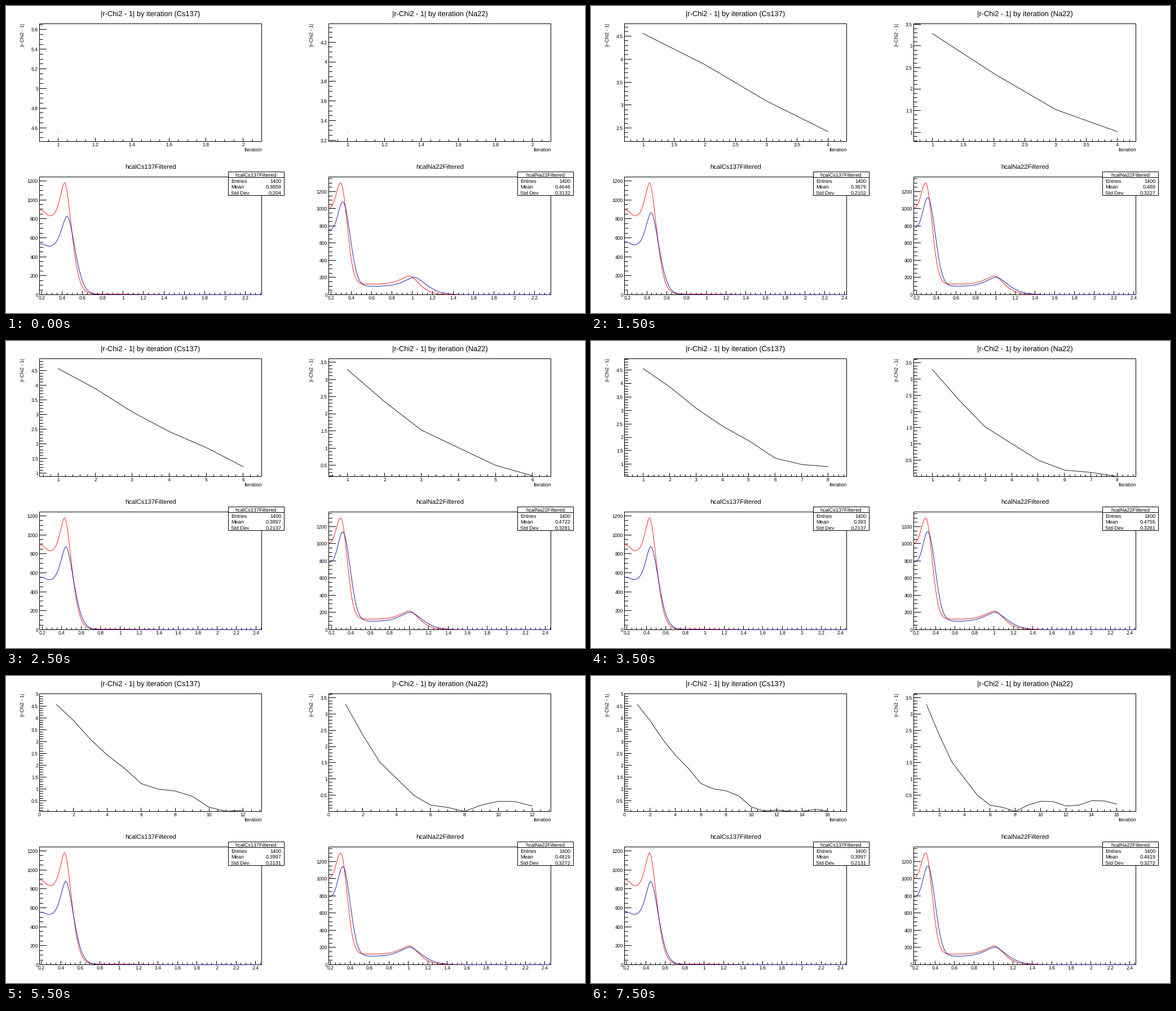
A matplotlib script that plays this animation: 1027 px wide and 545 px high, repeating every 8 s.

```python
import numpy as np
import matplotlib.pyplot as plt
from matplotlib.animation import FuncAnimation
from matplotlib.patches import Rectangle

W, H, DPI = 1027, 545, 100
STEPS, INTERVAL = 16, 500
PX = 72 / DPI
LEFT, WIDTH, SHIFT = 59.5, 394, 513
TOP, BASE, HEIGHT = 240.5, 512.5, 209
RED, BLUE = (1, 0, 0), (0, 0, 0.6)

plt.rcParams["font.family"] = "Liberation Sans"
plt.rcParams["text.hinting"] = "none"

# |r-Chi2 - 1| after each iteration
CHI = {
    "Cs137": [4.56, 3.885, 3.089, 2.42, 1.875, 1.225, 0.99, 0.91,
              0.694, 0.228, 0.055, 0.1, 0.05, 0.042, 0.13, 0.06],
    "Na22": [3.288, 2.36, 1.527, 1.015, 0.508, 0.2, 0.13, 0.005,
             0.2, 0.315, 0.307, 0.172, 0.2, 0.335, 0.327, 0.232],
}
Y_MAX = {"Cs137": 1241, "Na22": 1370}

# Calibration: statistics of the Cs137 spectrum at a few iterations
KEYS = [1, 4, 6, 8, 10, 12]
MEAN = [0.3859, 0.3879, 0.3897, 0.393, 0.396, 0.3997]
STD = [0.204, 0.2102, 0.2137, 0.2137, 0.2143, 0.2131]

fig = plt.figure(figsize=(W / DPI, H / DPI), dpi=DPI, facecolor="white")
ax = fig.add_axes([0, 0, 1, 1])
u = np.arange(0, WIDTH + 0.5, 0.5)


def peak(centre, height, floor, left, right, power):
    """Peak on a plateau that ends at the peak; widths differ per side."""
    d = u - centre
    core = np.exp(-(abs(d) / np.where(d < 0, left, right)) ** power)
    floor = np.where(d < 0, floor, 0)
    return floor + (height - floor) * core


def tail(height):
    return height * np.clip(1 - u / 240, 0, 1)


def cesium(centre, height, floor, left, right, bump, rest):
    shoulder = bump * np.exp(-(u / 12.5) ** 2.5)
    return peak(centre, height, floor, left, right, 1.75) + shoulder + tail(rest)


def sodium(first, second):
    return peak(*first, 2) + peak(*second, 1.6) + tail(9)


def measured(source):
    if source == "Cs137":
        return cesium(44.5, 1170, 812, 11.2, 17.6, 70, 12)
    return sodium((21, 1175, 875, 10.5, 16), (143.5, 215, 117, 24, 24.5))


def simulated(source, n):
    """Simulation settling towards the measurement, with a little noise."""
    s = np.exp(-(n - 1) / 2.5)
    noise = np.random.default_rng(n).uniform(-1, 1)
    if source == "Cs137":
        return cesium(46.5 + 2.5 * s, 878 - 52 * s, 520 - 20 * s,
                      12.5 + 1.5 * s, 19.7, 34 + 6 * noise, 3)
    return sodium((24.8, 1046 - 67 * s + 6 * noise, 683 - 35 * s, 11.3, 18.2),
                  (144 + 8 * s, 200, 92, 26, 30))


def text(x, y, s, size, ha="center", **kw):
    ax.text(x, y, s, fontsize=size * PX, ha=ha, va="baseline", **kw)


def line(x, y, color="black", width=1):
    ax.plot(x, y, color=color, lw=width * PX, snap=False)


def box(x, y, w, h, fill="none"):
    ax.add_patch(Rectangle((x, y), w, h, fc=fill, ec="black", lw=PX,
                           snap=False, zorder=2))


def nice_step(span, parts):
    raw = span / parts
    power = 10 ** np.floor(np.log10(raw) + 1e-9)
    return power * next(k for k in (1, 2, 5, 10) if raw / power <= k + 1e-6)


def multiples(step, lo, hi):
    eps = step * 1e-6
    first, last = np.ceil((lo - eps) / step), np.floor((hi + eps) / step)
    return np.arange(first, last + 1) * step


def axis(x0, base, lo, hi, parts, vertical):
    """Ticks and labels along one edge of a pad."""
    major = nice_step(hi - lo, parts)
    minor = nice_step(major, 5)
    length = 12 if vertical else 6
    size = HEIGHT if vertical else WIDTH
    for step, tick in ((minor, length / 2), (major, length)):
        for v in multiples(step, lo, hi):
            p = (v - lo) / (hi - lo) * size
            label = f"{round(v, 6) + 0.0:g}" if step == major else ""
            if vertical:
                p = np.floor(base - p) + 0.5
                line([x0, x0 + tick], [p, p])
                text(x0 - 2.5, p + 3, label, 8.7, "right")
            else:
                p = np.floor(x0 + p) + 0.5
                line([p, p], [base, base - tick])
                text(p, base + 8.5, label, 8.7)


def pad(x0, base, xr, yr, parts):
    box(x0, base - HEIGHT, WIDTH, HEIGHT)
    axis(x0, base, *xr, parts, vertical=False)
    axis(x0, base, *yr, parts, vertical=True)


def margins(values, floor):
    lo, hi = min(values), max(values)
    if lo == hi:
        hi += 1
    d = 0.1 * (hi - lo)
    return (floor if lo - d < 0 else lo - d), hi + d


def draw_graph(source, x0, n):
    ys = np.array(CHI[source][:n])
    xs = np.arange(1, n + 1)
    xr, yr = margins(xs, 0), margins(ys, 0.9 * ys.min())
    pad(x0, TOP, xr, yr, 10)
    px = x0 + (xs - xr[0]) / (xr[1] - xr[0]) * WIDTH
    py = TOP - (ys - yr[0]) / (yr[1] - yr[0]) * HEIGHT
    if n == 1:
        ax.plot(px, py, ",", color="0.5")
    else:
        line(px, py, width=0.85)
    text(x0 + WIDTH / 2, 18, f"|r-Chi2 - 1| by iteration ({source})", 12.9)
    text(x0 + WIDTH + 0.5, 258, "Iteration", 8.8, "right")
    text(x0 - 27, 30.5, "|r-Chi2 - 1|", 8.8, "right",
         rotation=90, rotation_mode="anchor")


def draw_stats(x, name, mean, std):
    box(x, 294.5, 99, 42, "white")
    line([x, x + 99], [304.5, 304.5])
    text(x + 49, 303, name, 9.1)
    rows = ("Entries", "1400"), ("Mean", f"{mean:.4g}"), ("Std Dev", f"{std:.4g}")
    for i, (key, value) in enumerate(rows):
        y = 314 + 10.4 * i
        text(x + 4.5, y, key, 9.1, "left")
        text(x + 94, y, value, 9.1, "right")


def draw_spectrum(source, x0, n, xr, mean, std):
    name = f"hcal{source}Filtered"
    pad(x0, BASE, xr, (0, Y_MAX[source]), 12)
    for counts, color in ((measured(source), RED), (simulated(source, n), BLUE)):
        line(x0 + u, BASE - counts / Y_MAX[source] * HEIGHT, color, 0.85)
    text(x0 + WIDTH / 2, 290, name, 11.3)
    draw_stats(x0 + 335, name, mean, std)


def update(i):
    n = i + 1
    ax.clear()
    ax.set(xlim=(0, W), ylim=(H, 0))
    ax.axis("off")
    mean, std = np.interp(n, KEYS, MEAN), np.interp(n, KEYS, STD)
    lo = mean - 1.019 * std
    xr = lo, lo + 10.7 * std
    stats = (mean, std), (mean + 0.3859 * std, 1.5353 * std)
    for k, source in enumerate(CHI):
        x0 = LEFT + k * SHIFT
        draw_graph(source, x0, n)
        draw_spectrum(source, x0, n, xr, *stats[k])
    return []


anim = FuncAnimation(fig, update, frames=STEPS, interval=INTERVAL,
                     init_func=lambda: [], repeat=True, repeat_delay=0)
plt.show()
```
